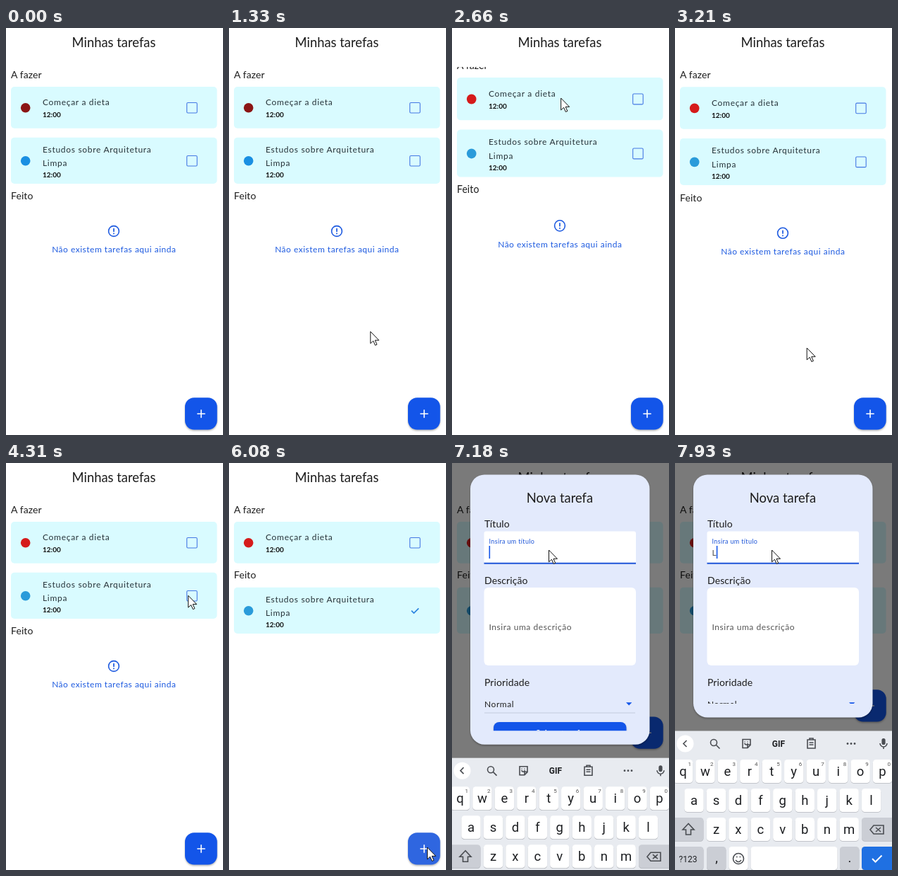
An HTML page for the animation above (8 s loop, 308x575 px).

```html
<!DOCTYPE html>
<html lang="pt">
<head>
<meta charset="utf-8">
<title>Minhas tarefas</title>
<style>
html, body { margin: 0; width: 100%; height: 100%; overflow: hidden; background: #fff; }
svg { display: block; font-family: Lato, "Open Sans", sans-serif; }
.title { font-size: 18.4px; text-anchor: middle; fill: #1c1c1c; }
.head { font-size: 14px; letter-spacing: .1px; fill: #1c1c1c; }
.item { font-size: 12px; letter-spacing: .7px; fill: #263238; }
.time { font-size: 10px; font-weight: 700; fill: #111; }
.note { font-size: 12px; letter-spacing: .5px; text-anchor: middle; fill: #1d5ae0; }
.hint { font-size: 12px; letter-spacing: .55px; fill: #555; }
.btn { font-size: 12.4px; font-weight: 700; text-anchor: middle; }
.card { fill: #d9fbff; }
.line { fill: none; stroke: #4478e4; stroke-width: 1.1; }
.blue { fill: #1355e9; }
.icon { fill: none; stroke: #4a4d52; stroke-width: 1.6; }
#keys { font-family: Roboto, sans-serif; font-size: 18.5px; text-anchor: middle; fill: #1d1f22; }
#keys .small { font-size: 8px; fill: #555; }
#keys .mid { font-size: 12px; }
</style>
</head>
<body>
<svg width="308" height="575" viewBox="0 0 308 575">
  <defs>
    <clipPath id="listClip"><rect y="55" width="308" height="520"/></clipPath>
    <clipPath id="formClip"><rect id="formArea" x="26" y="64" width="254" height="478"/></clipPath>
    <filter id="soft" x="-20%" y="-20%" width="140%" height="150%" color-interpolation-filters="sRGB"><feDropShadow dx="0" dy="1.5" stdDeviation="1.3" flood-opacity=".3"/></filter>
  </defs>
  <rect width="308" height="575" fill="#fff"/>
  <text class="title" x="153" y="27.3">Minhas tarefas</text>

  <g clip-path="url(#listClip)"><g id="list">
    <text class="head" x="7" y="71">A fazer</text>
    <rect class="card" x="7" y="83" width="292.5" height="58.7" rx="5"/>
    <circle id="red" cx="27.7" cy="112.7" r="6.8"/>
    <text class="item" x="52" y="109">Começar a dieta</text>
    <text class="time" x="52" y="125.7">12:00</text>
    <rect class="line" x="256.7" y="105.5" width="14.5" height="14.5" rx="1.5"/>
    <text id="done" class="head" x="7" y="242.3">Feito</text>
    <g id="second">
      <rect class="card" x="7" y="154.7" width="292.5" height="65.3" rx="5"/>
      <circle id="cyan" cx="27.7" cy="187.7" r="6.8"/>
      <text class="item" x="52" y="175.7">Estudos sobre Arquitetura</text>
      <text class="item" x="52" y="195.2">Limpa</text>
      <text class="time" x="52" y="211">12:00</text>
      <rect id="box" class="line" x="256.7" y="180.5" width="14.5" height="14.5" rx="1.5"/>
      <path id="check" d="M259 187.7l3.4 3.4 6.8-6.8" fill="none" stroke="#2b84e0" stroke-width="1.7"/>
    </g>
    <g id="empty">
      <circle cx="153" cy="287" r="7.4" fill="none" stroke="#1d5ae0" stroke-width="1.6"/>
      <path d="M153 283v5m0 1.6v1.7" stroke="#1d5ae0" stroke-width="1.7"/>
      <text class="note" x="153.3" y="317">Não existem tarefas aqui ainda</text>
    </g>
  </g></g>

  <g id="fab" filter="url(#soft)">
    <rect id="fabFace" x="254" y="522.3" width="45.7" height="45.3" rx="13"/>
    <path d="M277 539.3v11.4m-5.7-5.7h11.4" stroke="#fff" stroke-width="1.6"/>
  </g>

  <g id="modal">
    <rect width="308" height="575" fill="#000" fill-opacity=".52"/>
    <rect id="sheet" x="26" y="16.5" width="254.5" height="545" rx="20" fill="#e3eafc" filter="url(#soft)"/>
    <text class="title" x="153" y="56">Nova tarefa</text>
    <g clip-path="url(#formClip)">
      <text class="head" x="46" y="91">Título</text>
      <rect id="field" x="45.5" y="96.5" width="215.5" height="39" rx="6" fill="#fff"/>
      <path id="underline" d="M45.5 141.7h215.5" stroke="#1f55d8" stroke-width="2"/>
      <text id="label" class="hint" x="52.5">Insira um título</text>
      <text id="typed" class="hint" x="52.5" y="131">L</text>
      <rect id="caret" y="117" width="1.6" height="18" class="blue"/>
      <g id="rest">
        <text class="head" x="46" y="164">Descrição</text>
        <rect x="45.5" y="169.5" width="215.5" height="110" rx="6" fill="#fff"/>
        <text class="hint" x="52.5" y="229.5">Insira uma descrição</text>
        <text class="head" x="46" y="308">Prioridade</text>
        <text class="hint" x="46" y="338.5" style="fill:#222">Normal</text>
        <path class="blue" d="M247 331.7h8.4l-4.2 4.2z"/>
        <path d="M46 346.5h214" stroke="#c3cbdc"/>
        <g filter="url(#soft)"><rect class="blue" x="59" y="359.5" width="188.5" height="31.5" rx="8"/></g>
        <text class="btn" x="153" y="380" fill="#fff">Salvar tarefa</text>
        <rect x="59" y="404" width="188.5" height="31.5" rx="8" fill="#a8e7f8"/>
        <text class="btn" x="153" y="424.5" fill="#1d50d8">Sair</text>
      </g>
    </g>
  </g>

  <g id="keys"></g>
  <path id="pointer" d="M0 0V16.8l4-3.6 2.7 6.2 2.5-1.1-2.7-6h5.5z" fill="#fff" stroke="#111" stroke-linejoin="round"/>
</svg>
<script>
const $ = id => document.getElementById(id);
const set = (id, attrs) => { for (const k in attrs) $(id).setAttribute(k, attrs[k]); };
const show = (id, on) => set(id, { visibility: on ? 'visible' : 'hidden' });
const move = (id, x, y) => set(id, { transform: `translate(${x} ${y})` });
const ramp = (t, a, b) => Math.min(1, Math.max(0, (t - a) / (b - a)));
const ease = u => u * u * (3 - 2 * u);

// Linear track through [time, ...values] points
function track(t, points) {
  const i = points.findIndex(p => p[0] > t);
  if (i === 0) return points[0].slice(1);
  if (i < 0) return points[points.length - 1].slice(1);
  const a = points[i - 1], b = points[i], u = ramp(t, a[0], b[0]);
  return a.slice(1).map((v, k) => v + (b[k + 1] - v) * u);
}

function buildKeys() {
  const gray = '#cbced5';
  let out = '<rect y="378.5" width="308" height="197" fill="#e8ebf0"/>';
  const cap = (x, y, w, fill = '#fff') =>
    out += `<rect x="${x}" y="${y + .8}" width="${w}" height="33" rx="4.5" fill="#b5b8be"/>` +
           `<rect x="${x}" y="${y}" width="${w}" height="33" rx="4.5" fill="${fill}"/>`;
  const text = (s, x, y, cls = '') => out += `<text class="${cls}" x="${x}" y="${y}">${s}</text>`;
  const icon = (d, extra = '') => out += `<path class="icon" d="${d}" ${extra}/>`;
  [['qwertyuiop', 11.5], ['asdfghjkl', 27], ['zxcvbnm', 58.5]].forEach(([row, x0], r) => {
    [...row].forEach((c, i) => {
      const x = x0 + i * 31.45, y = 419 + r * 41;
      cap(x - 13.7, y, 27.4);
      text(c, x, y + 22.5);
      if (!r) text((i + 1) % 10, x + 9.3, y + 9, 'small');
    });
  });
  cap(-4, 501, 44.5, gray);
  cap(265, 501, 47, gray);
  cap(-4, 542, 44.5, gray);
  cap(45, 542, 27.4, gray);
  cap(76.3, 542, 27.4);
  cap(107.5, 542, 123);
  cap(234, 542, 27.4, gray);
  cap(265, 542, 47, '#1f70e2');
  text('?123', 18.5, 564, 'mid');
  text(',', 59, 564);
  text('.', 248, 564);
  icon('M19 509.5l-8 8.5h4.5v7h7v-7h4.5z');
  icon('M282 512h14v12h-14l-5-6zM285 515l7 6m0-6l-7 6');
  icon('M280 559l4.5 4.5 9-9', 'style="stroke:#fff;stroke-width:2"');
  icon('M97.5 559a7.5 7.5 0 1 1-15 0a7.5 7.5 0 1 1 15 0M86 561q4 5 8 0M87 556.5h1.6m3 0h1.6');
  out += '<circle cx="14.5" cy="396.5" r="12" fill="#fff"/>';
  icon('M16.5 392l-4.5 4.5 4.5 4.5');
  icon('M59.5 395a4.5 4.5 0 1 1-9 0a4.5 4.5 0 1 1 9 0M58.5 398.5l5 5');
  icon('M96 390.5h11v8l-4 4h-7zM107 398h-4v4M98.5 396q3 4 5 0M98.5 394h1m3 0h1');
  text('GIF', 147, 400.5, 'mid" font-weight="700');
  icon('M188 391h11v12h-11zM191 391v-2h5v2M190.5 395h6m-6 3h6');
  for (const x of [245, 250, 255]) out += `<circle cx="${x}" cy="396.5" r="1.4" fill="#4a4d52"/>`;
  out += '<rect x="293.4" y="389" width="5.2" height="9" rx="2.6" fill="#4a4d52"/>';
  icon('M291 396a5 5 0 0 0 10 0M296 401v3');
  $('keys').innerHTML = out;
}

const PATH = [[990, 206, 580], [1060, 206, 550], [1200, 198, 485], [1340, 201, 425], [1480, 203, 365],
  [1620, 195, 420], [1820, 172, 527], [1890, 169, 524], [1960, 166.5, 508], [2100, 168, 465],
  [2230, 160, 390], [2370, 149, 310], [2510, 150, 190], [2660, 154.7, 98.5], [2800, 150, 180],
  [3000, 158, 330], [3200, 185, 450], [3420, 229, 490], [3560, 266, 430], [3700, 276, 310],
  [3910, 273, 190], [4170, 273, 190], [4310, 258.7, 187.3], [5180, 258.7, 187.3], [5320, 260, 230],
  [5560, 270, 380], [5800, 281, 520], [5940, 281.5, 543], [6300, 281.5, 543], [6520, 215, 310], [6770, 137.5, 123]];
// Overscroll: positive stretches from the top edge, negative from the bottom
const STRETCH = [[1480, 0], [1820, .022], [1960, .01], [2100, 0], [2300, -.012], [2660, -.0266],
  [2900, -.005], [2960, 0], [3160, .015], [3420, 0]];

function draw(t) {
  const [x, y] = track(t, PATH);
  show('pointer', t >= 990);
  move('pointer', x, y);

  const [s] = track(t, STRETCH), scale = 1 + Math.abs(s), anchor = s < 0 ? 575 : 56;
  set('list', { transform: `translate(0 ${anchor * (1 - scale)}) scale(1 ${scale})` });
  set('red', { fill: t < 2200 ? '#8b1515' : '#d51b1b' });
  set('cyan', { fill: t < 2200 ? '#1a8fe2' : '#2a9bda' });

  const done = t >= 4710;
  move('second', 0, done ? 21 : 0);
  move('done', 0, done ? -79 : 0);
  show('empty', !done);
  show('box', !done);
  show('check', done);
  set('check', { 'stroke-dasharray': `${15 * ramp(t, 4640, 4850)} 20` });

  const k = ease(ramp(t, 6950, 7270)), f = ease(ramp(t, 6840, 7010));
  set('fabFace', { fill: t >= 6010 && t < 6500 ? '#2f66e0' : '#1355e9' });
  move('fab', 0, -202 * k);
  set('modal', { opacity: ramp(t, 6100, 6210) });
  set('sheet', { height: 545 - 202 * k });
  set('formArea', { height: 478 - 202 * k });
  set('field', { height: 39 + 6.5 * f, rx: 6 - 3 * f });
  show('underline', f > 0);
  set('label', { y: 121 - 7.5 * f });
  $('label').style.cssText = `font-size:${12 - 3 * f}px;letter-spacing:${.5 - .15 * f}px;fill:${f > .5 ? '#1d55d8' : '#555'}`;
  move('rest', 0, 6.5 * f);

  const typed = t >= 7930;
  show('typed', typed);
  show('caret', f > .5);
  set('caret', { x: typed ? 58.8 : 52.5 });
  show('keys', k > 0);
  move('keys', 0, 202 * (1 - k));
}

buildKeys();
const start = performance.now();
(function loop() {
  draw((performance.now() - start) % 8000);
  requestAnimationFrame(loop);
})();
</script>
</body>
</html>
```
